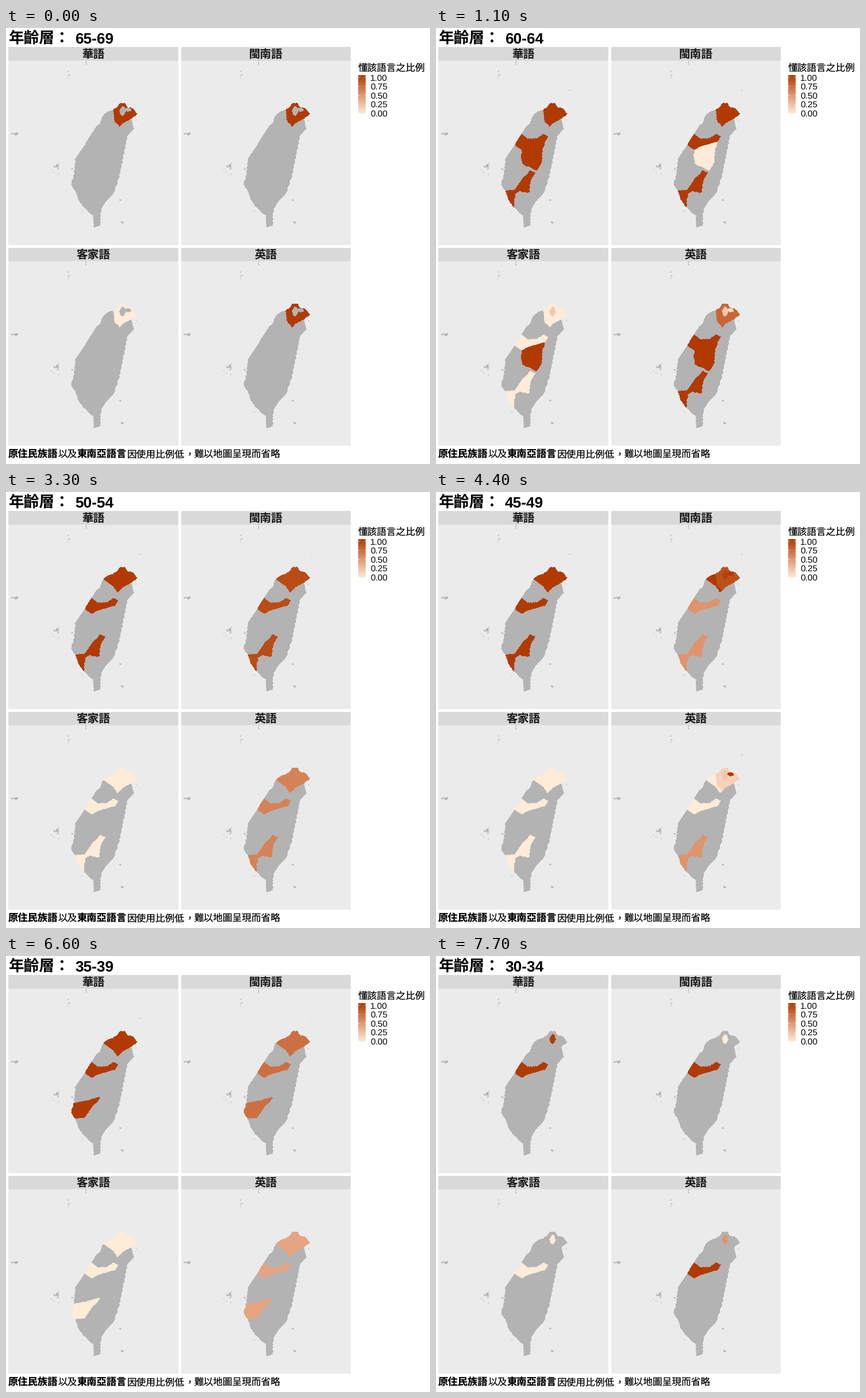
Recreate the animation shown at these times as a matplotlib script. Size 738x759 px, loop 8 s.

```python
import numpy as np
import matplotlib.pyplot as plt
from matplotlib.animation import FuncAnimation
from matplotlib.collections import PolyCollection
from matplotlib.colors import LinearSegmentedColormap
from matplotlib.patches import Polygon, Rectangle

plt.rcParams["text.hinting"] = "no_hinting"

W, H, DPI = 738, 759, 100
STEP_MS, HOLD_MS, LOOP_MS = 100, 1100, 8000
GREY, PANEL, STRIP = "#b3b3b3", "#ebebeb", "#d9d9d9"
DX, DY = 300.3, 349.2
CJK, LATIN = "Noto Sans CJK JP", "Liberation Sans"
RAMP = LinearSegmentedColormap.from_list("ramp", ["#feebd8", "#df946d", "#b13a00"])


def rough(points):
    """Subdivide an outline and ruffle it by position, so shared borders agree."""
    p = np.array(points, float)
    out = []
    for a, b in zip(p, np.roll(p, -1, axis=0)):
        n = max(1, int(np.hypot(*(b - a)) / 1.4))
        out += [a + (b - a) * k / n for k in range(n)]
    q = np.array(out)
    x, y = q.T
    wave = np.c_[np.sin(1.7 * x + 1.1 * y), np.sin(1.3 * x - 1.9 * y)]
    return q + .5 + .7 * wave


def blob(x, y, rx, ry):
    a = np.linspace(0, 2 * np.pi, 9)[:-1]
    return np.c_[x + rx * np.cos(a), y + ry * np.sin(a)]


# Key points of the coast, clockwise from the north-west, one stretch per region
NORTH = [(187, 142), (193, 138), (197, 131), (206, 131), (210, 137), (219, 140),
         (228, 149), (217, 157)]
EAST = [(217, 157), (221, 174), (210, 188), (205, 214), (196, 258), (187, 285),
        (167, 309), (163, 322), (163, 343), (153, 346), (152, 326), (135, 311)]
TAINAN = [(135, 311), (126, 298), (121, 283)]
CHIAYI = [(121, 283), (113, 272), (118, 256)]
MIDWEST = [(118, 256), (121, 228), (138, 203)]
TAICHUNG = [(138, 203), (148, 185)]
MIAOLI = [(148, 185), (156, 173), (163, 166)]
HSINCHU = [(166, 160), (169, 153)]
TAOYUAN = [(169, 153), (176, 146), (187, 142)]

# Inland borders
NT_W = [(187, 142), (189, 161), (197, 170)]
NT_S = [(197, 170), (204, 164), (217, 157)]
TAO_S = [(169, 153), (186, 165), (193, 175)]
MI_E = [(172, 166), (178, 177), (186, 185)]
TC_N = [(148, 185), (159, 193), (176, 192), (186, 185), (195, 188)]
TC_S = [(138, 203), (150, 212), (158, 207), (189, 198)]
NTO_S = [(184, 213), (183, 232), (175, 247), (151, 236), (148, 222)]
TN_N = [(121, 283), (136, 282), (147, 266), (164, 248)]
TN_E = [(171, 251), (163, 268), (161, 286), (145, 283), (138, 287), (135, 300)]

LAND = NORTH + EAST + TAINAN + CHIAYI + MIDWEST + TAICHUNG + MIAOLI + HSINCHU + TAOYUAN
REGIONS = {
    "tao": TAOYUAN + NT_W + TAO_S[::-1],
    "hs": HSINCHU + TAO_S + MI_E[::-1],
    "mi": MIAOLI + MI_E + TC_N[3::-1],
    "nt": NORTH + NT_S[::-1] + NT_W[::-1],
    "tp": blob(202.5, 144, 4.5, 7.5),
    "kl": blob(212, 141.5, 4.8, 3),
    "tc": TAICHUNG + TC_N + TC_S[::-1],
    "nto": TC_S[1:] + NTO_S,
    "cy": CHIAYI + [(140, 252), (160, 246)] + TN_N[::-1],
    "tn": TAINAN + TN_N + TN_E,
}


def make_isles():
    """A few larger isles plus seeded specks around each archipelago."""
    rng = np.random.default_rng(4)
    big = [(17, 184, 4, 2.2), (9.5, 184, 2.5, 1), (89, 239, 2.8, 3.3), (84, 240, 2, 1.5),
           (201.5, 338, 2.5, 2), (198.5, 298.5, 1.3, 1.5), (115, 245, 3, 1)]
    specks = [(84, 245, 8, 11, 10), (139, 60, 2, 3, 4), (109, 80, 2, 8, 6),
              (226.5, 160.5, 0, 0, 1), (132, 319, 0, 0, 1)]
    isles = [rough(blob(*b)) for b in big]
    for x, y, sx, sy, n in specks:
        for dx, dy in rng.uniform(-1, 1, (n, 2)):
            isles.append(blob(x + sx * dx, y + sy * dy, .9, .9))
    return isles


ISLES = make_isles()
LANGS = ["華語", "閩南語", "客家語", "英語"]
# age, region codes, then the share knowing each language (a single number holds for all)
DATA = [
    ("65-69", "nt", 1, 1, 0, 1),
    ("60-64", "nt tp kl tc nto tn", 1, [1, 1, 1, 1, 0, 1],
     [0, .2, 0, 0, 1, 0], [.75, .2, .1, 1, 1, 1]),
    ("55-59", "nt tp kl tao hs mi tc tn", 1, [1, .93, 1, 1, 1, .5, .87, 1],
     0, [.8, .6, 1, .5, 1, .5, .4, .5]),
    ("50-54", "nt tp kl tao tc tn", 1, .9, 0, .6),
    ("45-49", "nt tp kl tao tc tn", 1, [.87, .95, 1, 1, .5, .5], 0, [.15, .22, 1, 0, 0, .5]),
    ("40-44", "nt tp kl tao tc nto", 1, [.72, .65, 0, 1, 1, 1], 0, [.15, .27, .5, 0, 0, 1]),
    ("35-39", "nt tp kl tao tc cy", 1, .7, 0, .4),
    ("30-34", "tp tc", 1, [0, 1], 0, [.5, 1]),
]

fig = plt.figure(figsize=(W / 100, H / 100), dpi=DPI, facecolor="white")
ax = fig.add_axes([0, 0, 1, 1])
ax.axis("off")


def text(x, y, s, px, font=CJK, **kw):
    return ax.text(x, y, s, fontsize=px * 72 / DPI, family=font, va="baseline", **kw)


def box(x, y, w, h, color):
    return ax.add_patch(Rectangle((x, y), w, h, fc=color, lw=0))


def shape(points, shift):
    return ax.add_patch(Polygon(rough(points) + shift, fc=GREY, lw=0, aa=False))


def draw_panel(i):
    shift = np.array([DX * (i % 2), DY * (i // 2)])
    x, y = shift + (4.3, 33.3)
    box(x, y, 295.8, 344.6, PANEL)
    box(x, y, 295.8, 23.5, STRIP)
    text(x + 147.7, y + 19, LANGS[i], 19.7, weight="bold", color="#1a1a1a", ha="center")
    ax.add_collection(PolyCollection([s + shift for s in ISLES], facecolors=GREY, linewidths=0))
    shape(LAND, shift)
    parts = {code: [shape(points, shift)] for code, points in REGIONS.items()}
    # a lone islet belongs to Keelung
    parts["kl"].append(box(*(shift + (232, 108)), 1, 1, GREY))
    return parts


def draw_legend():
    text(612.5, 74.3, "懂該語言之比例", 16.7)
    ax.imshow(np.linspace(1, 0, 128)[:, None], cmap=RAMP, vmin=0, vmax=1, aspect="auto",
              extent=(613.4, 625.6, 149.5, 83.3), interpolation="bilinear")
    for k in range(5):
        y = 85.4 + 15.55 * k
        for x in (613.4, 623.2):
            ax.plot([x, x + 2.4], [y, y], color="white", lw=.4)
        text(634, y + 6, f"{1 - k / 4:.2f}", 15.4, LATIN)
    ax.set(xlim=(0, W), ylim=(H, 0))


def draw_caption():
    x, y, px = 4, 747, 16.7
    for s, bold in (("原住民族語", True), ("以及", False), ("東南亞語言", True),
                    ("因使用比例低", False)):
        size = 17.3 if bold else px
        text(x, y, s, size, weight="bold" if bold else "normal")
        x += size * len(s)
    # the comma sits in the middle of its full-width cell
    text(x + .3 * px, y - .27 * px, "，", px)
    text(x + px, y, "難以地圖呈現而省略", px)


panels = [draw_panel(i) for i in range(4)]
draw_legend()
draw_caption()
text(4, 26.8, "年齡層：", 26.7, weight="bold")
age_text = text(120, 26.8, "", 26.3, LATIN, weight="bold")


def update(frame):
    age, codes, *rows = DATA[frame * STEP_MS // HOLD_MS]
    codes = codes.split()
    age_text.set_text(age)
    for parts, row in zip(panels, rows):
        shares = dict(zip(codes, np.broadcast_to(row, len(codes))))
        for code, patches in parts.items():
            color = RAMP(float(shares[code])) if code in shares else GREY
            for patch in patches:
                patch.set_facecolor(color)
    return []


anim = FuncAnimation(fig, update, frames=LOOP_MS // STEP_MS, interval=STEP_MS,
                     init_func=lambda: update(0), repeat=True, repeat_delay=0, blit=False)
plt.show()
```
